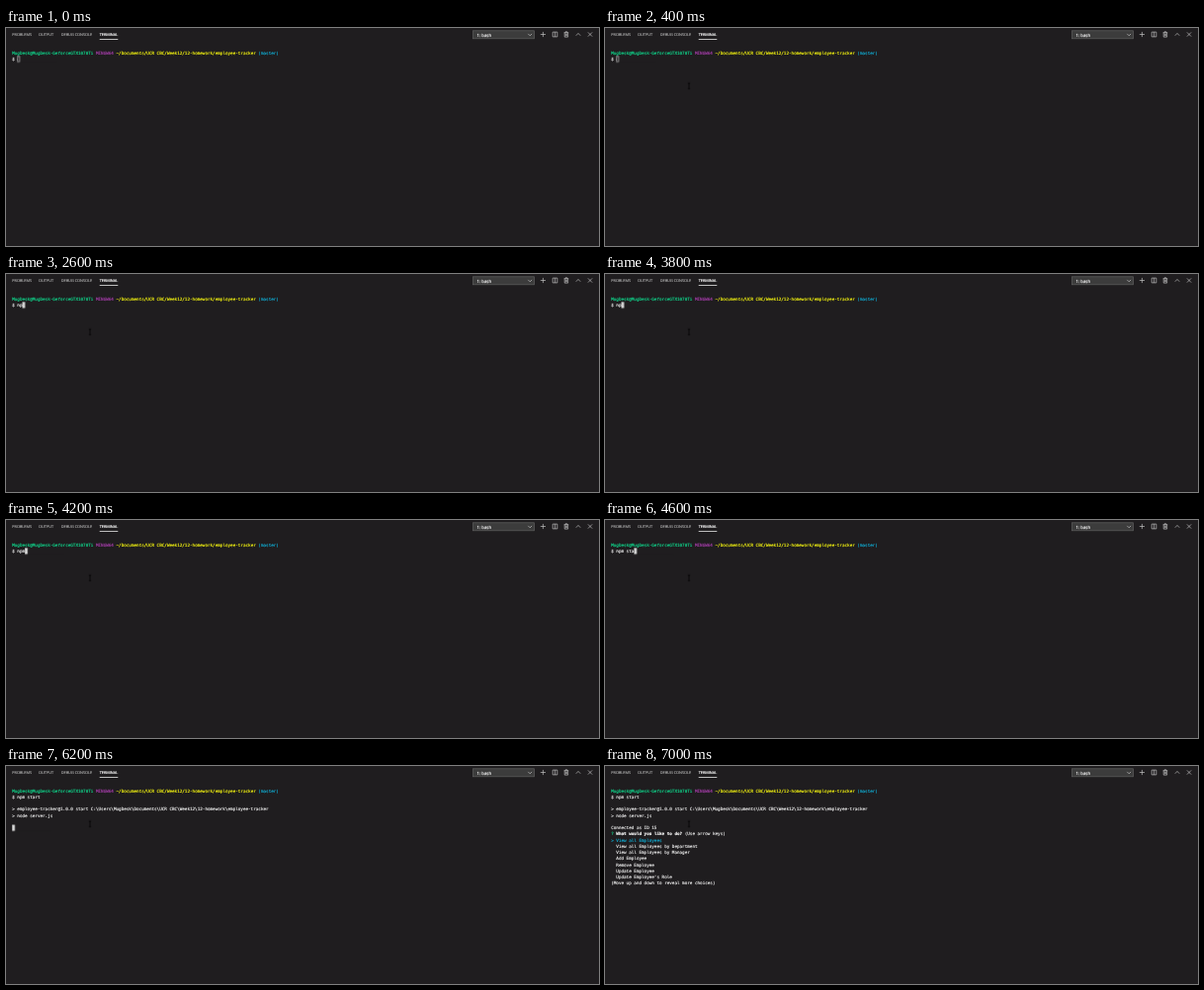
An HTML page that plays this animation: 600x221 px, repeating every 8000 ms.

```html
<!DOCTYPE html>
<html lang="en">
<head>
<meta charset="utf-8">
<title>Terminal</title>
<style>
  html, body { margin: 0; width: 100%; height: 100%; overflow: hidden; background: #1f1d1f; }
  svg { display: block; width: 100%; height: 100%; }
  text { white-space: pre; text-rendering: geometricPrecision; }
  text, tspan { fill: currentColor; stroke: currentColor; stroke-width: .16; }

  .tabs { font: 3.85px "Open Sans", sans-serif; color: #a0a0a0; }
  .tabs .active { color: #fff; }
  .tabs .shell { font-size: 4.3px; color: #f4f4f4; }
  .icons { fill: none; stroke: #d8d8d8; stroke-width: .6; }

  .term { font: 4.28px "DejaVu Sans Mono", monospace; color: #e8e8e8; }
  .green { color: #10d088; }
  .purple { color: #a03ca4; }
  .yellow { color: #f2f210; }
  .cyan { color: #11a8cd; }
  .bold { font-weight: bold; color: #fff; }

  .cursor, .block, .pointer, .output, .menu { animation: 8s step-end infinite; }
  .cursor { animation-name: move; }
  .block { animation-name: focus; stroke: #e2e2e2; stroke-width: .5; }
  .pointer { animation-name: point; fill: none; stroke: #000; stroke-width: .7; }
  .output { animation-name: showOutput; }
  .menu { animation-name: showMenu; }

  /* One column is 2.577px wide, one row 6.24px high. */
  @keyframes move {
    0%    { transform: translate(5.15px, 6.24px); }
    32.5% { transform: translate(10.31px, 6.24px); }
    37.5% { transform: translate(12.89px, 6.24px); }
    47.5% { transform: translate(10.31px, 6.24px); }
    50%   { transform: translate(12.89px, 6.24px); }
    55%   { transform: translate(18.04px, 6.24px); }
    57.5% { transform: translate(23.19px, 6.24px); }
    60%   { transform: translate(25.77px, 6.24px); }
    62.5% { transform: translate(28.35px, 6.24px); }
    65%   { transform: translate(0, 12.48px); }
    77.5% { transform: translate(0, 37.44px); opacity: 1; }
    87.5%, 100% { transform: translate(0, 37.44px); opacity: 0; }
  }
  @keyframes focus {
    0% { fill: #1f1d1f; }
    15%, 100% { fill: #e2e2e2; }
  }
  @keyframes point {
    0%   { transform: translate(5px, 63.5px); opacity: 0; }
    2.5% { transform: translate(5px, 63.5px); opacity: 1; }
    5%, 100% { transform: translate(85px, 58.7px); opacity: 1; }
  }
  @keyframes showOutput {
    0% { opacity: 0; }
    77.5%, 100% { opacity: 1; }
  }
  @keyframes showMenu {
    0% { opacity: 0; }
    87.5%, 100% { opacity: 1; }
  }
</style>
</head>
<body>
<svg viewBox="0 0 600 221">
  <rect width="600" height="221" fill="#1f1d1f"/>

  <g class="tabs">
    <text x="6.2" y="8.2">PROBLEMS</text>
    <text x="33" y="8.2">OUTPUT</text>
    <text x="55.7" y="8.2">DEBUG CONSOLE</text>
    <text x="94.7" y="8.2" class="active">TERMINAL</text>
    <rect x="94.7" y="11" width="18.6" height=".8" fill="#e7e7e7"/>
    <rect x="472.6" y="2.8" width="62" height="8" fill="#3c3c3c" stroke="#606060" stroke-width=".7"/>
    <text x="476.6" y="8.5" class="shell">1: bash</text>
  </g>

  <g class="icons">
    <path d="M528.3 5.9l1.9 1.9l1.9-1.9"/>
    <path d="M540.8 6.5h5.2M543.4 3.9v5.2"/>
    <path d="M553.2 4.1h4.6v4.8h-4.6zM555.5 4.1v4.8"/>
    <path d="M564.6 4.7h4.6M566 4.7v-.9h1.8v.9M565.2 4.7v4.4h3.4v-4.4M566.4 5.6v2.6M567.4 5.6v2.6"/>
    <path d="M576.8 7.7l2.2-2.3l2.2 2.3"/>
    <path d="M588.9 4.4l4.2 4.2M593.1 4.4l-4.2 4.2"/>
  </g>

  <g class="term" transform="translate(6.2 26.75)">
    <text><tspan class="green">MugDesk@MugDesk-GeforceGTX1070Ti</tspan> <tspan class="purple">MINGW64</tspan> <tspan class="yellow">~/Documents/UCR CBC/Week12/12-homework/employee-tracker</tspan> <tspan class="cyan">(master)</tspan></text>
    <text y="6.24">$ npm start</text>
    <g class="output">
      <text y="18.72">&gt; employee-tracker@1.0.0 start C:\Users\MugDesk\Documents\UCR CBC\Week12\12-homework\employee-tracker</text>
      <text y="24.96">&gt; node server.js</text>
    </g>
    <g class="menu">
      <text y="37.44">Connected as ID 15</text>
      <text y="43.68"><tspan class="green">?</tspan> <tspan class="bold">What would you like to do?</tspan> (Use arrow keys)</text>
      <text y="49.92" class="cyan">&gt; View all Employees</text>
      <text y="56.16">  View all Employees by Department</text>
      <text y="62.4">  View all Employees by Manager</text>
      <text y="68.64">  Add Employee</text>
      <text y="74.88">  Remove Employee</text>
      <text y="81.12">  Update Employee</text>
      <text y="87.36">  Update Employee's Role</text>
      <text y="93.6">(Move up and down to reveal more choices)</text>
    </g>
  </g>

  <!-- The cursor carries a cover that hides what is not typed yet. -->
  <g transform="translate(6.2 22.1)">
    <g class="cursor">
      <rect width="40" height="6.24" fill="#1f1d1f"/>
      <rect class="block" x=".25" y=".25" width="2.1" height="5.74"/>
    </g>
  </g>

  <path class="pointer" d="M-1.2-2.8h2.4M0-2.8v5.6M-1.2 2.8h2.4"/>
</svg>
</body>
</html>
```
